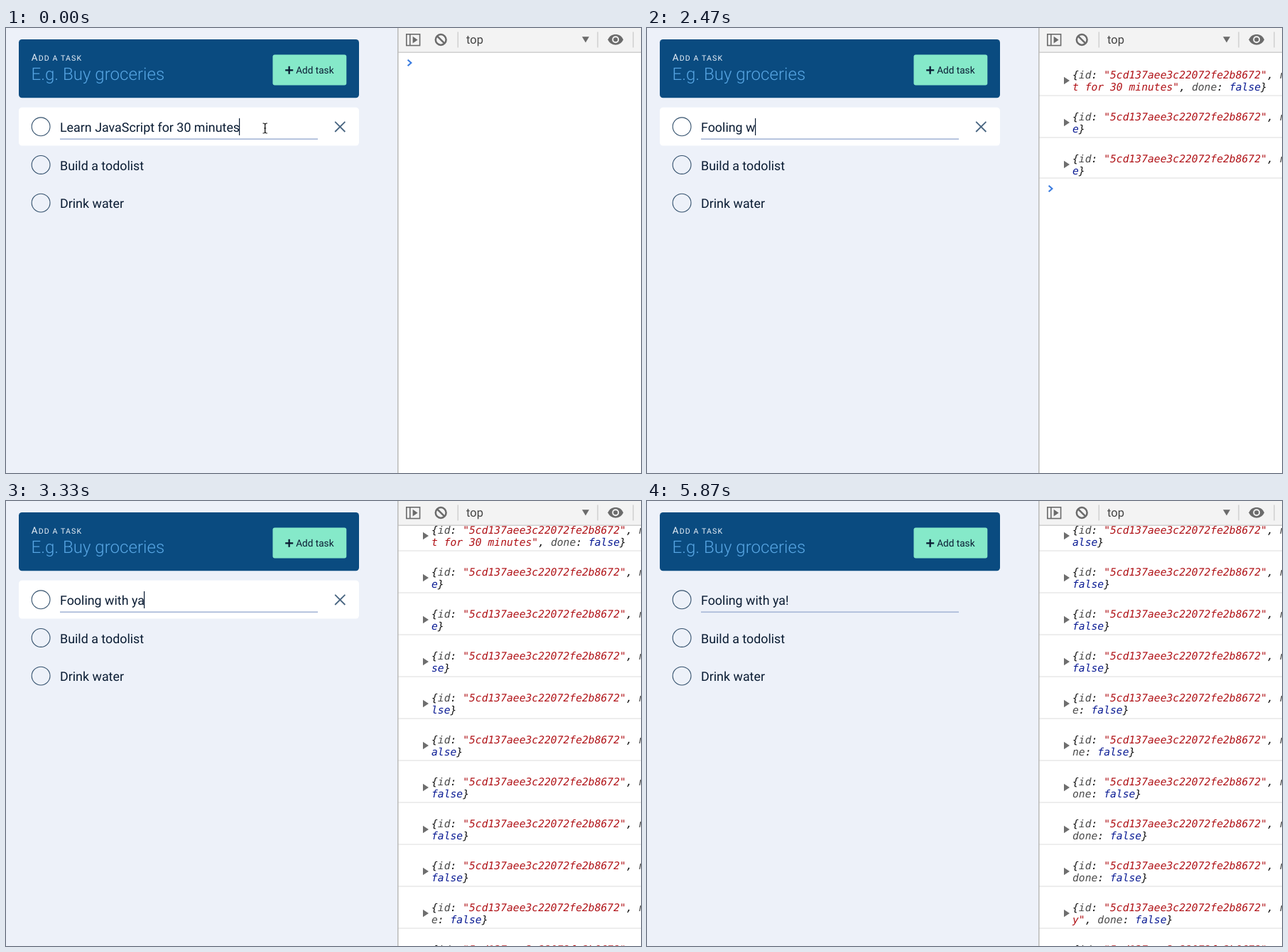
Recreate the animation shown at these times as an HTML page with a canvas. Size 894 px wide and 626 px high, loop 6140 ms.

```html
<!DOCTYPE html>
<html lang="en">
<head>
<meta charset="utf-8">
<title>Todolist</title>
<style>
html, body { margin: 0; width: 100%; height: 100%; overflow: hidden; background: #edf1f9; }
canvas { display: block; }
</style>
</head>
<body>
<canvas id="stage" width="894" height="626"></canvas>
<script>
const ctx = document.getElementById('stage').getContext('2d');
const LOOP = 6140;
const SANS = 'Roboto, sans-serif';
const MONO = 'italic 14.68px "DejaVu Sans Mono", monospace';
const CHAR = 14.68 * 0.602;
const BLACK = '#111', GREY = '#4a4a4a', RED = '#b01217', BLUE = '#0b1c94';
const NAVY = '#0a1c33', SLATE = '#486581', ICON = '#6b6b6b';

const OLD_TASK = 'Learn JavaScript for 30 minutes';
const NEW_TASK = 'Fooling with ya!';
const SELECT = 800, CLEAR = 1130, LEAVE = 5400;

// When each character is typed and when each reply is logged
const keyTimes = [1600, 1730, 1870, 1930, 2070, 2130, 2270, 2330, 2470,
  2530, 2600, 2670, 2800, 3070, 3200, 3400];
const logTimes = [1730, 2200, 2400, 2530, 2670, 2730, 2800, 2930, 3000,
  3130, 3330, 3400, 3530, 3600, 3730, 4000];
// Wrapped characters on the second line of each log
const tailLengths = [31, 2, 2, 3, 4, 5, 6, 6, 6, 9, 10, 11, 12, 12, 16, 17];

const countBefore = (times, t) => times.filter(x => x <= t).length;

function rect(x, y, w, h, color) {
  ctx.fillStyle = color;
  ctx.fillRect(x, y, w, h);
}

function box(x, y, w, h, r, color) {
  ctx.fillStyle = color;
  ctx.beginPath();
  ctx.roundRect(x, y, w, h, r);
  ctx.fill();
}

function poly(points, color) {
  ctx.fillStyle = color;
  ctx.beginPath();
  points.forEach(([x, y]) => ctx.lineTo(x, y));
  ctx.fill();
}

function line(points, width, color) {
  ctx.strokeStyle = color;
  ctx.lineWidth = width;
  ctx.beginPath();
  points.forEach(([x, y]) => ctx.lineTo(x, y));
  ctx.stroke();
}

function ring(x, y, r, width, color) {
  ctx.strokeStyle = color;
  ctx.lineWidth = width;
  ctx.beginPath();
  ctx.arc(x, y, r, 0, 7);
  ctx.stroke();
}

function text(str, x, y, font, color, spacing = 0) {
  ctx.font = font;
  ctx.letterSpacing = spacing + 'px';
  ctx.fillStyle = color;
  ctx.fillText(str, x, y);
  return ctx.measureText(str).width;
}

function drawHeader() {
  box(18, 16, 479, 82.3, 4.5, '#0a4b80');
  const w = text('A', 35.8, 46, `13.4px ${SANS}`, '#eaf1f8', 1.1);
  text('DD A TASK', 35.8 + w, 46, `10.6px ${SANS}`, '#eaf1f8', 1.1);
  text('E.g. Buy groceries', 35.5, 73.4, `300 24.1px ${SANS}`, '#57a5e2');
  box(375.5, 37.6, 103.8, 42.8, 3, '#85e9c9');
  rect(393.2, 58.2, 11, 2.3, NAVY);
  rect(397.5, 53.8, 2.3, 11, NAVY);
  text('Add task', 408.2, 64.4, `13.6px ${SANS}`, NAVY);
}

function drawTask(index, label) {
  const y = 138.8 + index * 53.64;
  ring(49.1, y, 12.9, 1.1, '#34516d');
  return text(label, 76, y + 7.2, `17.88px ${SANS}`, NAVY);
}

function drawPointer(x, y) {
  line([[x, y - 6], [x, y + 6]], 1.3, '#111');
  line([[x - 1.5, y], [x + 1.5, y]], 1, '#111');
  for (const s of [-1, 1]) {
    line([[x - 3.2, y + s * 7], [x - 1, y + s * 6.7], [x, y + s * 5.6],
      [x + 1, y + s * 6.7], [x + 3.2, y + s * 7]], 1.1, '#111');
  }
}

function caretOn(t) {
  if (t < CLEAR) return t < 470;
  const last = Math.max(CLEAR, ...keyTimes.filter(x => x <= t));
  return Math.floor((t - last) / 495 + 0.052) % 2 === 0;
}

function drawList(t) {
  const hover = t < LEAVE ? 1 : Math.max(0, 0.8 - Math.floor((t - LEAVE) / 66) * 0.2);
  ctx.globalAlpha = hover;
  box(18, 111.8, 479, 53.7, 4.5, '#fff');
  line([[463.2, 131.8], [477.4, 146]], 1.8, SLATE);
  line([[477.4, 131.8], [463.2, 146]], 1.8, SLATE);
  ctx.globalAlpha = 1;

  rect(76, 155.4, 363, 1.7, '#a9b9d8');
  if (t >= SELECT && t < CLEAR) rect(76, 127, 253, 24, '#b3d7fe');
  const label = t < CLEAR ? OLD_TASK : NEW_TASK.slice(0, countBefore(keyTimes, t));
  const width = drawTask(0, label);
  if (caretOn(t)) rect(Math.round(76 + width - 0.6), 127, 1.2, 24, NAVY);
  drawTask(1, 'Build a todolist');
  drawTask(2, 'Drink water');
  if (t < CLEAR) drawPointer(364.7, 141);
}

function drawRuns(runs, x, y, skip = 0) {
  for (const [str, color] of runs) {
    const part = str.slice(skip);
    skip = Math.max(0, skip - str.length);
    text(part, x, y, MONO, color);
    x += part.length * CHAR;
  }
}

function drawLog(index, top) {
  poly([[587, top + 34.8], [595, top + 40], [587, top + 45.2]], '#6e6e6e');
  drawRuns([['{', BLACK], ['id', GREY], [': ', BLACK],
    ['"5cd137aee3c22072fe2b8672"', RED], [', ', BLACK], ['name', GREY]], 599, top + 36.8);
  const value = index ? NEW_TASK.slice(0, index) : OLD_TASK;
  const tail = [[value + '"', RED], [', ', BLACK], ['done', GREY],
    [': ', BLACK], ['false', BLUE], ['}', BLACK]];
  const total = tail.reduce((sum, run) => sum + run[0].length, 0);
  drawRuns(tail, 599, top + 53.8, total - tailLengths[index]);
}

function drawConsole(t) {
  rect(551, 0, 343, 626, '#fff');
  ctx.save();
  ctx.beginPath();
  ctx.rect(552, 34, 342, 592);
  ctx.clip();
  const count = countBefore(logTimes, t);
  const top = 34 - Math.max(0, count * 59 - 624);
  for (let i = 0; i < count; i++) {
    drawLog(i, top + i * 59);
    const gap = i < count - 1 ? 60.4 : 58.4;
    rect(552, top + i * 59 + gap, 342, 1.3, '#e4e4e4');
  }
  const y = top + count * 59 + 15;
  line([[565.6, y - 4.3], [570.4, y], [565.6, y + 4.3]], 2.1, '#3a7ce0');
  ctx.restore();
}

function drawToolbar() {
  rect(552, 0, 342, 34, '#f3f3f3');
  rect(552, 33.6, 342, 1.3, '#c9c9c9');
  rect(551, 0, 1.6, 626, '#bdbdbd');

  ctx.strokeStyle = ICON;
  ctx.lineWidth = 1.6;
  ctx.strokeRect(563.8, 8.8, 18.8, 15.8);
  line([[568.8, 8.8], [568.8, 24.6]], 1.6, ICON);
  poly([[572.6, 11.8], [579.6, 16.7], [572.6, 21.6]], ICON);

  ring(612.2, 16.5, 7.4, 2.5, ICON);
  line([[607, 11.3], [617.4, 21.7]], 2.5, ICON);

  for (const x of [635.6, 832.4, 882.4]) rect(x, 5.5, 1.3, 22, '#cbcbcb');
  text('top', 648, 21.6, `16.5px ${SANS}`, '#444');
  poly([[811, 12.2], [821, 12.2], [816, 20.6]], ICON);

  ctx.fillStyle = ICON;
  ctx.beginPath();
  ctx.moveTo(847.4, 16.3);
  ctx.bezierCurveTo(851, 6.5, 865.4, 6.5, 869, 16.3);
  ctx.bezierCurveTo(865.4, 26.1, 851, 26.1, 847.4, 16.3);
  ctx.fill();
  ring(858.2, 16.3, 4, 1.9, '#f3f3f3');
}

function draw(now) {
  const t = now % LOOP;
  ctx.textRendering = 'geometricPrecision';
  rect(0, 0, 894, 626, '#edf1f9');
  drawHeader();
  drawList(t);
  drawConsole(t);
  drawToolbar();
}

const start = performance.now();
function tick() {
  draw(performance.now() - start);
  requestAnimationFrame(tick);
}
tick();
</script>
</body>
</html>
```
